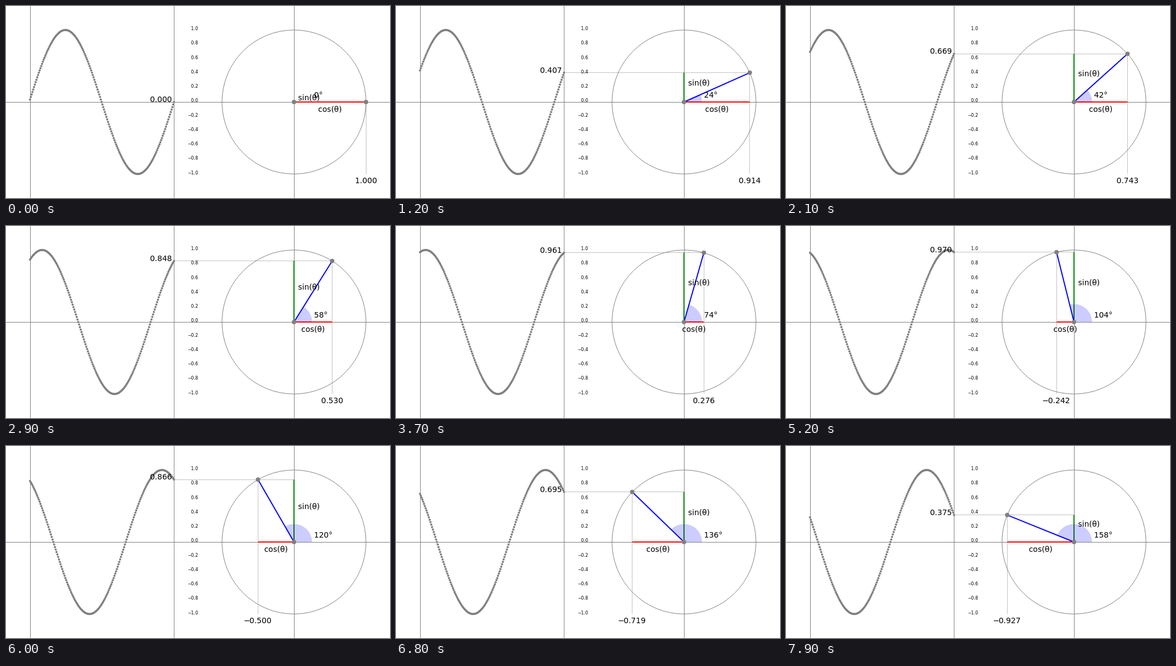
Animation, 700 px wide and 350 px high, one loop 8000 ms. Source, as an HTML page with a canvas:

```html
<!DOCTYPE html>
<html lang="en">
<head>
<meta charset="utf-8">
<title>Sine and cosine on the unit circle</title>
<style>
  html, body { margin: 0; width: 100%; height: 100%; overflow: hidden; background: #fff; }
  canvas { display: block; }
</style>
</head>
<body>
<canvas id="stage" width="700" height="350"></canvas>
<script>
const ctx = document.getElementById('stage').getContext('2d');
const W = 700, H = 350, R = 131.25;
const CX = 525, CY = 175, LEFT = 43.75, RIGHT = 306.25;
const GRAY = '#808080', PALE = '#c0c0c0';
const STEP_MS = 100, STEPS = 80, STEP_DEG = 2, DOTS = 180;
const FONT = '"DejaVu Sans", sans-serif';
const MINUS_ADVANCE = 0.632, MINUS_INSET = 0.103;

const rad = deg => deg * Math.PI / 180;
const crisp = v => Math.floor(v) + 0.5;

function line(x1, y1, x2, y2, color, width = 1) {
  ctx.strokeStyle = color;
  ctx.lineWidth = width;
  ctx.beginPath();
  ctx.moveTo(x1, y1);
  ctx.lineTo(x2, y2);
  ctx.stroke();
}

function dot(x, y, r) {
  ctx.fillStyle = GRAY;
  ctx.beginPath();
  ctx.arc(x, y, r, 0, 2 * Math.PI);
  ctx.fill();
}

function text(str, x, y, align = 'left', size = 14) {
  ctx.font = `${size}px ${FONT}`;
  ctx.fillStyle = '#000';
  ctx.textAlign = align;
  ctx.fillText(str, x, y);
}

// A number with a narrow minus sign; align is 'center' or 'right'.
function number(value, digits, x, y, align, size = 14) {
  const str = Math.abs(value).toFixed(digits);
  ctx.font = `${size}px ${FONT}`;
  const minus = value < 0 ? MINUS_ADVANCE * size : 0;
  const total = ctx.measureText(str).width + minus;
  const left = x - (align === 'center' ? total / 2 : total);
  if (minus) text('\u2212', left - MINUS_INSET * size, y, 'left', size);
  text(str, left + minus, y, 'left', size);
}

function drawGuides(px, py) {
  const y = crisp(py), x = crisp(px);
  line(RIGHT, y, Math.max(px, CX), y, PALE);
  line(x, py, x, CY + R, PALE);
}

function drawAxes() {
  for (const x of [44.5, 306.5, 525.5]) line(x, 0, x, H, GRAY);
  line(0, 175.5, W, 175.5, GRAY);
  ctx.beginPath();
  ctx.arc(CX, CY, R, 0, 2 * Math.PI);
  ctx.stroke();
  for (let i = -5; i <= 5; i++) {
    number(i / 5, 1, 350, Math.ceil(CY - i / 5 * R), 'right', 8);
  }
}

function drawWave(deg) {
  const gap = (RIGHT - LEFT) / (DOTS - 1);
  for (let i = 0; i < DOTS; i++) {
    dot(RIGHT - i * gap, CY - R * Math.sin(rad(deg - i * STEP_DEG)), 2);
  }
}

function drawAngle(deg, px, py) {
  line(CX, CY, px, CY, '#f00', 2);
  line(CX, CY, CX, py, '#008000', 2);
  ctx.fillStyle = 'rgba(0, 0, 255, 0.2)';
  ctx.beginPath();
  ctx.moveTo(CX, CY);
  ctx.arc(CX, CY, R / 4, 0, -rad(deg), true);
  ctx.fill();
  if (deg > 0) line(CX, CY, px, py, '#00f', 2);
  dot(CX, CY, 4);
  dot(px, py, 4);
}

function drawLabels(deg, sin, cos, px, py) {
  text('sin(θ)', 532.5, Math.round((CY + py) / 2 - 3.5));
  text('cos(θ)', (CX + px) / 2, 193, 'center');
  text(deg + '°', 561.5, 167);
  number(sin, 3, 302.5, Math.round(py), 'right');
  number(cos, 3, px, 323, 'center');
}

function draw(deg) {
  const sin = Math.sin(rad(deg)), cos = Math.cos(rad(deg));
  const px = CX + R * cos, py = CY - R * sin;
  ctx.fillStyle = '#fff';
  ctx.fillRect(0, 0, W, H);
  drawGuides(px, py);
  drawAxes();
  drawWave(deg);
  drawAngle(deg, px, py);
  drawLabels(deg, sin, cos, px, py);
}

function tick() {
  draw(Math.floor(performance.now() / STEP_MS) % STEPS * STEP_DEG);
  requestAnimationFrame(tick);
}
tick();
</script>
</body>
</html>
```
